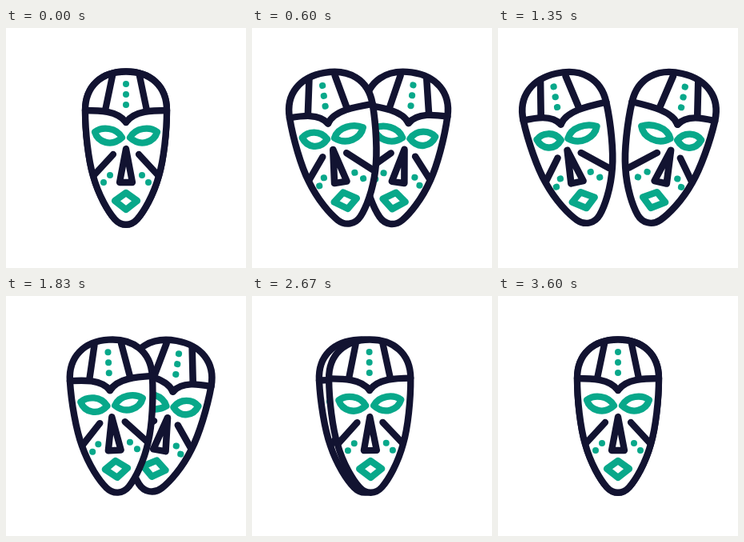
Write an HTML page with a canvas that moves like this. It is 300 px wide and 300 px high and loops after 4130 ms.

```html
<!DOCTYPE html>
<html lang="en">
<head>
<meta charset="utf-8">
<title>Two masks</title>
<style>
  html, body { margin: 0; width: 100%; height: 100%; overflow: hidden; background: #fff; }
  canvas { display: block; width: 100vw; height: 100vh; }
</style>
</head>
<body>
<canvas id="stage" width="300" height="300"></canvas>
<script>
const ctx = document.getElementById('stage').getContext('2d');
const NAVY = '#121331', GREEN = '#08a88a';
const LOOP = 4130, STEP = 30, END = 3600;

// Each swing is [end time, turn reached, skew]; skew < 1 starts fast, > 1 starts slowly.
const FRONT = [[1080, -1.03, 0.7], [2200, 0.4, 1.65], [2800, -0.07, 0.7], [END, 0, 1]];
const BACK = [[1330, 1.04, 0.7], [2470, -0.4, 1.65], [2720, -0.21, 0.7], [END, 0, 1]];

function turnAt(swings, t) {
  let from = 0, value = 0;
  for (const [to, target, skew] of swings) {
    if (t <= to) {
      const u = ((t - from) / (to - from)) ** skew;
      return value + (target - value) * (1 - Math.cos(Math.PI * u)) / 2;
    }
    from = to;
    value = target;
  }
  return value;
}

// The face is symmetric about x = 0, with y measured from its middle.
const OUTLINE = new Path2D(`M-51 -47 C-51 -78 -30 -95.5 0 -95.5 S51 -78 51 -47
  C51 -20 47 15 41 35 C34 60 22 80 14 89 C6 98 -6 98 -14 89
  C-22 80 -34 60 -41 35 C-47 15 -51 -20 -51 -47 Z`);

function drawMask(signedTurn) {
  const turn = Math.abs(signedTurn);

  // The middle of the face bulges forward, so it moves further than the rim.
  const place = ([x, y]) => {
    const across = (1 - (x / 51) ** 2) * (1 + x / 60);
    const down = 1 - ((y + 35) / 110) ** 2;
    return [x - 8 * turn * across * down, y];
  };
  const polyline = (points, closed) => {
    ctx.beginPath();
    points.forEach(p => ctx.lineTo(...place(p)));
    if (closed) ctx.closePath();
    ctx.stroke();
  };
  const curve = (...points) => {
    const [start, ...rest] = points.map(place);
    ctx.beginPath();
    ctx.moveTo(...start);
    for (let i = 0; i < rest.length; i += 3) ctx.bezierCurveTo(...rest[i], ...rest[i + 1], ...rest[i + 2]);
    ctx.stroke();
  };
  const dot = (x, y) => {
    ctx.beginPath();
    ctx.arc(...place([x, y]), 4, 0, Math.PI * 2);
    ctx.fill();
  };

  ctx.save();
  ctx.translate(150, 150);
  if (signedTurn > 0) ctx.scale(-1, 1);
  ctx.translate(-56.5 * turn, 0);
  ctx.rotate(-12.5 * turn * Math.PI / 180);
  ctx.scale(1 + 0.04 * turn, 1);

  ctx.lineWidth = 8.3;
  ctx.lineCap = ctx.lineJoin = 'round';
  ctx.fillStyle = '#fff';
  ctx.strokeStyle = NAVY;
  ctx.fill(OUTLINE);
  ctx.stroke(OUTLINE);
  polyline([[0, 1], [-8, 43], [8, 43]], true);

  for (const side of [-1, 1]) {
    ctx.strokeStyle = NAVY;
    curve([side * 51, -47], [side * 35, -47], [side * 10, -47], [0, -32]);
    polyline([[side * 17, -90], [side * 26, -47]]);
    polyline([[side * 16, 8], [side * 40, 34]]);

    ctx.strokeStyle = ctx.fillStyle = GREEN;
    curve([side * 39, -20], [side * 35, -7], [side * 18, -1], [side * 5, -13],
      [side * 12, -26], [side * 30, -27], [side * 39, -20]);
    dot(side * 20, 34);
    dot(side * 28, 43);
  }
  for (let i = 0; i < 3; i++) dot(0, -80 + 13 * i);
  polyline([[0, 56], [14, 66], [0, 77], [-14, 66]], true);
  ctx.restore();
}

function render(elapsed) {
  const t = Math.min(END, Math.floor(elapsed % LOOP / STEP) * STEP);
  ctx.fillStyle = '#fff';
  ctx.fillRect(0, 0, 300, 300);
  drawMask(turnAt(BACK, t));
  drawMask(turnAt(FRONT, t));
}

const start = performance.now();
function tick() {
  render(performance.now() - start);
  requestAnimationFrame(tick);
}
tick();
</script>
</body>
</html>
```
